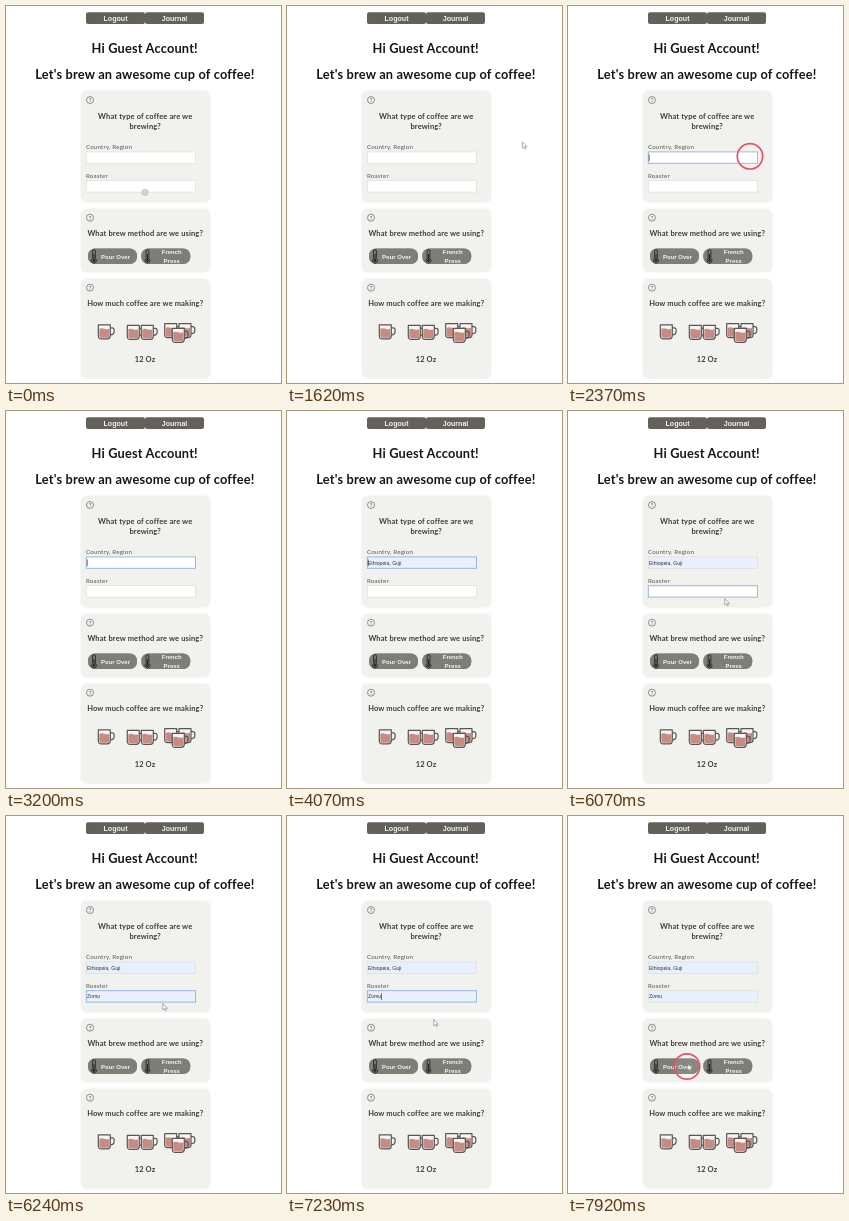
An HTML page for the animation above (8 s loop, 275x377 px).

```html
<!DOCTYPE html>
<html lang="en">
<head>
<meta charset="utf-8">
<title>Coffee brew form</title>
<style>
  html, body { margin: 0; width: 100%; height: 100%; overflow: hidden; background: #fff; }
  svg { display: block; width: 275px; height: 377px; }
  text { font-family: Lato, "Open Sans", sans-serif; fill: #3c3c3a; }
  .mid { text-anchor: middle; }
  .head { font-size: 12.8px; font-weight: 700; letter-spacing: .18px; fill: #161616; }
  .title { font-size: 7.5px; font-weight: 700; letter-spacing: .13px; }
  .label { font-size: 6.2px; letter-spacing: .18px; fill: #555; }
  .nav, .btn, .value { font-family: "Liberation Sans", Arial, sans-serif; }
  .nav { font-size: 7.1px; font-weight: 700; fill: #f3f3f1; }
  .btn { font-size: 6px; font-weight: 700; fill: #f3f3f1; }
  .value { font-size: 5.15px; fill: #333; }
  .card { fill: #f1f1ed; filter: drop-shadow(0 .5px 1.2px rgba(0, 0, 0, .13)); }
  .pill { fill: #7e7d76; filter: drop-shadow(0 .5px .6px rgba(0, 0, 0, .35)); }
  .caret { stroke: #333; stroke-width: .7; }
</style>
</head>
<body>
<svg viewBox="0 0 275 377">
  <defs>
    <g id="mug">
      <path d="M13 4h1.800q2 0 2 2v2q0 3-3.800 3" fill="none" stroke="#5a5655" stroke-width="1.200"/>
      <path d="M1 1h12v11q0 3-3 3h-6q-3 0-3-3z" fill="#f7f4f1"/>
      <path d="M2 5q2.500-1 5 0t5 0v7q0 2-2 2h-6q-2 0-2-2z" fill="#c68b83"/>
      <path d="M1 1h12v11q0 3-3 3h-6q-3 0-3-3z" fill="none" stroke="#5a5655" stroke-width="1.200" stroke-linejoin="round"/>
    </g>
    <g id="help">
      <circle r="3.500" fill="none" stroke="#666" stroke-width=".7"/>
      <text class="mid" y="1.800" font-size="5">?</text>
    </g>
    <g id="thermo" fill="none" stroke="#262626">
      <path d="M-1.400 3V-4.500a1.400 1.400 0 0 1 2.800 0V3a2.500 2.500 0 1 1-2.800 0z" stroke-width=".9"/>
      <circle cy="5" r="1.400" fill="#262626" stroke="none"/>
      <path d="M0-1.500V5" stroke-width="1"/>
    </g>
  </defs>

  <rect x="80" y="6.300" width="59" height="11.600" rx="2" fill="#64615a"/>
  <rect x="139" y="6.300" width="59" height="11.600" rx="2" fill="#64615a"/>
  <text class="nav mid" x="109.500" y="14.700">Logout</text>
  <text class="nav mid" x="168.500" y="14.700">Journal</text>

  <text class="head mid" x="138.700" y="47">Hi Guest Account!</text>
  <text class="head mid" x="138.900" y="72.900">Let's brew an awesome cup of coffee!</text>

  <rect class="card" x="75.500" y="85.500" width="128" height="110.300" rx="5"/>
  <rect class="card" x="75.500" y="203.500" width="128" height="62" rx="5"/>
  <rect class="card" x="75.500" y="273.500" width="128" height="98.500" rx="5"/>
  <use href="#help" x="84" y="94"/>
  <use href="#help" x="84" y="211.700"/>
  <use href="#help" x="84" y="281.700"/>

  <text class="title mid" x="139.200" y="113">What type of coffee are we</text>
  <text class="title mid" x="139.200" y="123">brewing?</text>
  <text class="label" x="79.900" y="143.300">Country, Region</text>
  <text class="label" x="79.900" y="172.100">Roaster</text>
  <rect id="box1" x="80.300" y="145.900" width="109.200" height="11.400"/>
  <rect id="box2" x="80.300" y="174.700" width="109.200" height="11.400"/>
  <text id="origin" class="value" x="80.900" y="153.500">Ethiopeia, Guji</text>
  <path id="spell" d="M81 154.900h21.500M106 154.900h9" stroke="#d9465a" stroke-width=".8"/>
  <text id="roaster" class="value" x="80.900" y="182.300">Zomu</text>
  <path id="caret1" class="caret" d="M81.200 148.500v6.500"/>
  <path id="caret2" class="caret" d="M94.500 177.300v6.500"/>
  <path id="caret0" class="caret" d="M81.200 177.300v6.500"/>

  <text class="title mid" x="139.200" y="230.300">What brew method are we using?</text>
  <rect class="pill" x="82" y="242.500" width="49" height="15.500" rx="7"/>
  <rect class="pill" x="135.300" y="242.500" width="49" height="15.500" rx="7"/>
  <use href="#thermo" x="88" y="249.500"/>
  <use href="#thermo" x="141.500" y="249.500"/>
  <text class="btn mid" x="109.500" y="252.700">Pour Over</text>
  <text class="btn mid" x="165.800" y="248.300">French</text>
  <text class="btn mid" x="165.800" y="256.600">Press</text>

  <text class="title mid" x="139.200" y="300.100">How much coffee are we making?</text>
  <use href="#mug" x="91.300" y="317.800"/>
  <use href="#mug" x="120.300" y="318.300"/>
  <use href="#mug" x="134.300" y="318.300"/>
  <use href="#mug" x="157.700" y="316.700"/>
  <use href="#mug" x="172" y="316.700"/>
  <use href="#mug" x="165.300" y="321.300"/>
  <text class="title mid" x="139" y="356.300">12 Oz</text>

  <circle id="dot" cx="139" cy="186.200" r="3.200" fill="#bbb" fill-opacity=".55" stroke="#aaa" stroke-width=".5"/>
  <circle id="ring" r="12.700" fill="#fff" fill-opacity=".08" stroke="#e05468" stroke-width="1.700"/>
  <path id="arrow" d="M.3.300v6.400l1.500-1.300 1.100 2.200 1-.5-1-2.100h2z" fill="#fff" stroke="#777" stroke-width=".6" stroke-linejoin="round"/>
</svg>
<script>
  const LOOP = 8000;
  const $ = id => document.getElementById(id);
  const within = (t, a, b) => t >= a && t < b;
  const show = (id, on) => { $(id).style.opacity = +on; };
  const place = (id, x, y) => $(id).setAttribute("transform", `translate(${x} ${y})`);

  // [time, tip x, tip y]; a bare time hides the pointer
  const path = [
    [0], [1620, 235, 135.5], [1770, 205.5, 140.5], [1920, 192.5, 143.7], [2070],
    [4670, 167, 165.5], [4910],
    [6070, 156.5, 187.3], [6780, 155.5, 190.5], [6910, 153, 195.5], [7230, 146.5, 203.2],
    [7380, 136, 220], [7510, 125, 237], [7650, 119.5, 247.8]
  ];

  function paintBox(id, focus, filled) {
    const box = $(id);
    box.setAttribute("fill", filled ? "#e8f0fd" : "#fff");
    box.setAttribute("stroke", focus ? "#8fafe2" : "#dcdcd9");
    box.setAttribute("stroke-width", focus ? 0.9 : 0.7);
  }

  function draw(t) {
    paintBox("box1", within(t, 2370, 5410), t >= 4070);
    paintBox("box2", within(t, 5660, 7790), t >= 6240);

    show("origin", t >= 4070);
    show("spell", within(t, 4670, 5410));
    show("roaster", t >= 6240);
    show("caret1", within(t, 2370, 2870) || within(t, 3200, 4670));
    show("caret0", within(t, 5660, 6070));
    show("caret2", within(t, 6780, 7380));
    show("dot", t < 100);

    const late = t >= 7790;
    const fading = within(t, 2870, 3000) || within(t, 7790, 7920);
    place("ring", late ? 119 : 182, late ? 250.5 : 150.3);
    show("ring", fading ? 0.5 : within(t, 2370, 3000) || late);

    const [, x, y] = path.filter(p => p[0] <= t).pop();
    show("arrow", x !== undefined);
    if (x !== undefined) place("arrow", x, y);
  }

  const start = performance.now();
  function tick() {
    draw((performance.now() - start) % LOOP);
    requestAnimationFrame(tick);
  }
  tick();
</script>
</body>
</html>
```
